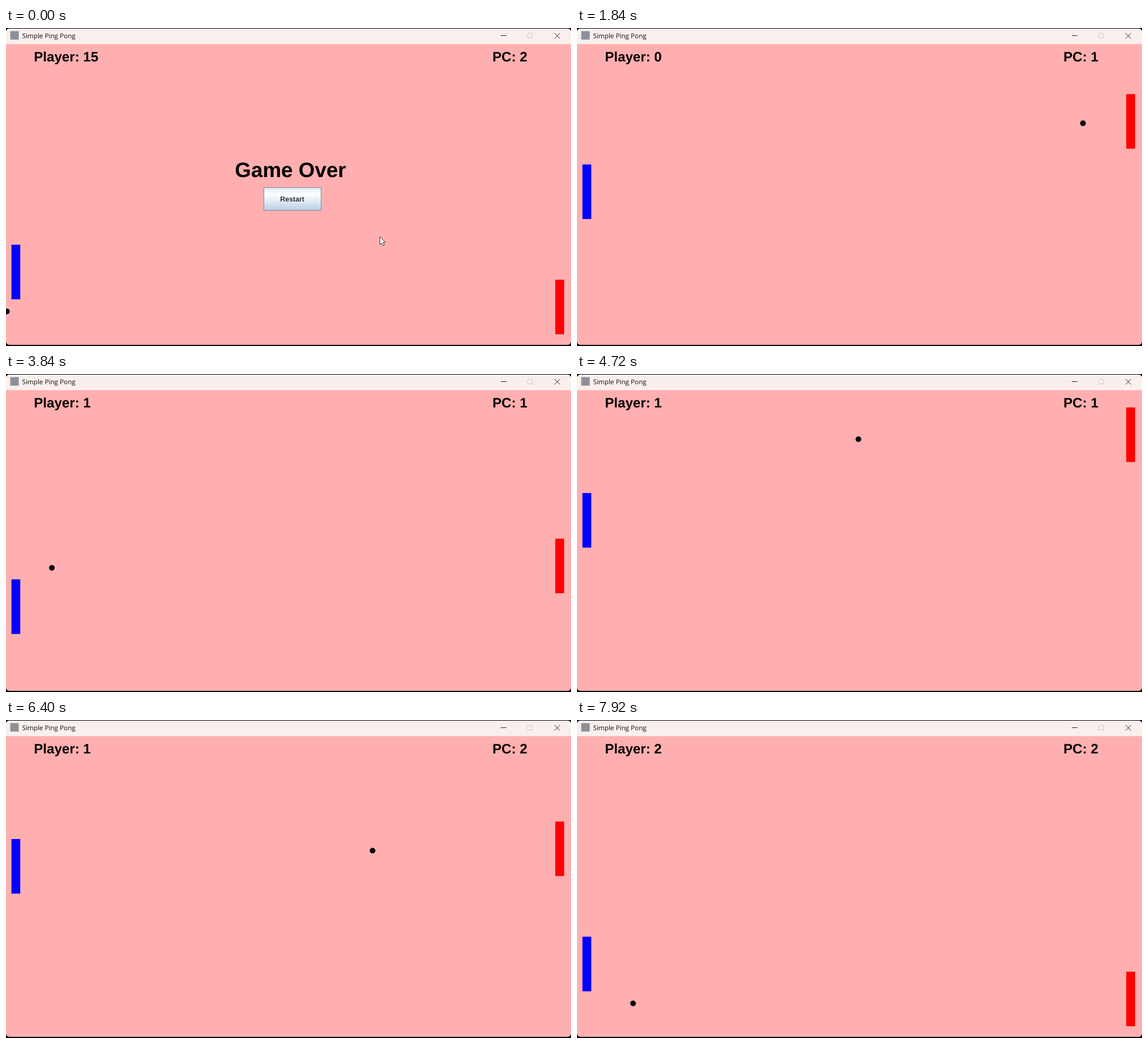
Animation of 998 by 561 pixels, one loop 8 s. Source, as an HTML page:

```html
<!DOCTYPE html>
<html lang="en">
<head>
<meta charset="utf-8">
<title>Simple Ping Pong</title>
<style>
  html, body { margin: 0; width: 100%; height: 100%; overflow: hidden; background: #000; }
  svg { display: block; width: 998px; height: 561px; }
  text { font: bold 24.1px "Liberation Sans", Arial, sans-serif; text-rendering: geometricPrecision; }
  .title { font: 11.7px "Open Sans", "Noto Sans", sans-serif; fill: #111; }
  .over { font-size: 36.8px; }
  .label { font-size: 12.4px; fill: #333; }
</style>
</head>
<body>
<svg viewBox="0 0 998 561">
  <defs>
    <linearGradient id="metal" x2="0" y2="1">
      <stop offset="0" stop-color="#dde8f3"/>
      <stop offset=".3" stop-color="#fff"/>
      <stop offset="1" stop-color="#b8cfe5"/>
    </linearGradient>
    <clipPath id="window"><rect y="1" width="998" height="558" rx="6"/></clipPath>
    <clipPath id="field"><rect y="28.5" width="998" height="530.5"/></clipPath>
  </defs>
  <g clip-path="url(#window)">
    <rect width="998" height="561" fill="#ffafaf"/>
    <rect width="998" height="28.5" fill="#f9f0ed"/>
  </g>
  <rect x="7.5" y="5.5" width="15" height="15" fill="#8d8f98"/>
  <text class="title" x="28.5" y="18">Simple Ping Pong</text>
  <g fill="none" stroke="#222">
    <path d="M874 13.5h10M969 9l9.5 9.5M978.500 9l-9.500 9.500"/>
    <rect x="921.5" y="9.500" width="8.500" height="8" rx="1" stroke="#cfc7c4"/>
  </g>
  <g clip-path="url(#field)">
    <text id="player" x="49.300" y="58.700"></text>
    <text id="pc" x="859.200" y="58.700"></text>
    <rect id="blue" x="9.600" width="15.600" height="96.300" fill="#00f"/>
    <rect id="red" x="970.200" width="15.600" height="96.300" fill="#f00"/>
    <circle id="ball" r="5"/>
  </g>
  <g id="menu">
    <text class="over" x="404.300" y="262.500">Game Over</text>
    <rect x="455.500" y="281.500" width="101" height="40" fill="url(#metal)" stroke="#7a8a99"/>
    <text class="label" x="484.300" y="306.400">Restart</text>
  </g>
  <path id="cursor" d="M0 0v13.500l3.200-2.900 2.300 5 2.300-1-2.200-4.900h4.100z" fill="#fff" stroke="#222" stroke-width=".9"/>
</svg>
<script>
const LOOP = 8000, STEP = 80, START = 608;
const LEFT = 30, SPAN_X = 935, TOP = 21, SPAN_Y = 544;

// time, unfolded horizontal travel, unfolded vertical travel
const travel = [
  [START, 469, 402], [1040, 670, 603], [2560, 1309, 1245], [3840, 1921, 1855],
  [5600, 2753, 2685], [7200, 3492, 3424], [7920, 3809, 3743]
];
const blueKeys = [
  [1280, 382.3], [1840, 240.7], [2900, 240.7], [3400, 362.3],
  [4080, 362.3], [4720, 210], [7200, 210], [7720, 382.3]
];
const cursorKeys = [[0, 660.5, 368.5], [480, 510, 298]];

const $ = id => document.getElementById(id);
const clamp = (v, lo, hi) => Math.min(hi, Math.max(lo, v));
const set = (id, attrs) => {
  for (const k in attrs) $(id).setAttribute(k, attrs[k]);
};
const show = (id, on) => set(id, { visibility: on ? "visible" : "hidden" });

function at(keys, t, col = 1) {
  let i = 1;
  while (i < keys.length - 1 && keys[i][0] < t) i++;
  const a = keys[i - 1], b = keys[i];
  const p = clamp((t - a[0]) / (b[0] - a[0]), 0, 1);
  return a[col] + (b[col] - a[col]) * p;
}

function fold(d, span) {
  const m = d % (2 * span);
  return m < span ? m : 2 * span - m;
}

function draw(t) {
  const playing = t >= START;
  let x = 1.5, y = 500, red = 444, player = 15, pc = 2;
  if (playing) {
    const u = at(travel, t, 1), v = at(travel, t, 2);
    x = LEFT + fold(u, SPAN_X);
    y = TOP + fold(v, SPAN_Y);
    player = Math.floor(u / (2 * SPAN_X));
    pc = Math.floor((u + SPAN_X) / (2 * SPAN_X));
    // the computer's paddle trails the ball a little
    const down = v % (2 * SPAN_Y) < SPAN_Y;
    red = clamp(y - (down ? 56 : 51.5), 28.5, 463.2);
    red = Math.max(red, 444 - (t - START) * 0.46);
  }
  set("ball", { cx: x, cy: y });
  set("red", { y: red });
  set("blue", { y: at(blueKeys, t) });
  $("player").textContent = "Player: " + player;
  $("pc").textContent = "PC: " + pc;
  show("menu", !playing);
  show("cursor", t < 960);
  set("cursor", { transform: `translate(${at(cursorKeys, t, 1)} ${at(cursorKeys, t, 2)})` });
}

const begin = performance.now();
function tick() {
  const t = (performance.now() - begin) % LOOP;
  draw(Math.floor(t / STEP) * STEP);
  requestAnimationFrame(tick);
}
tick();
</script>
</body>
</html>
```
